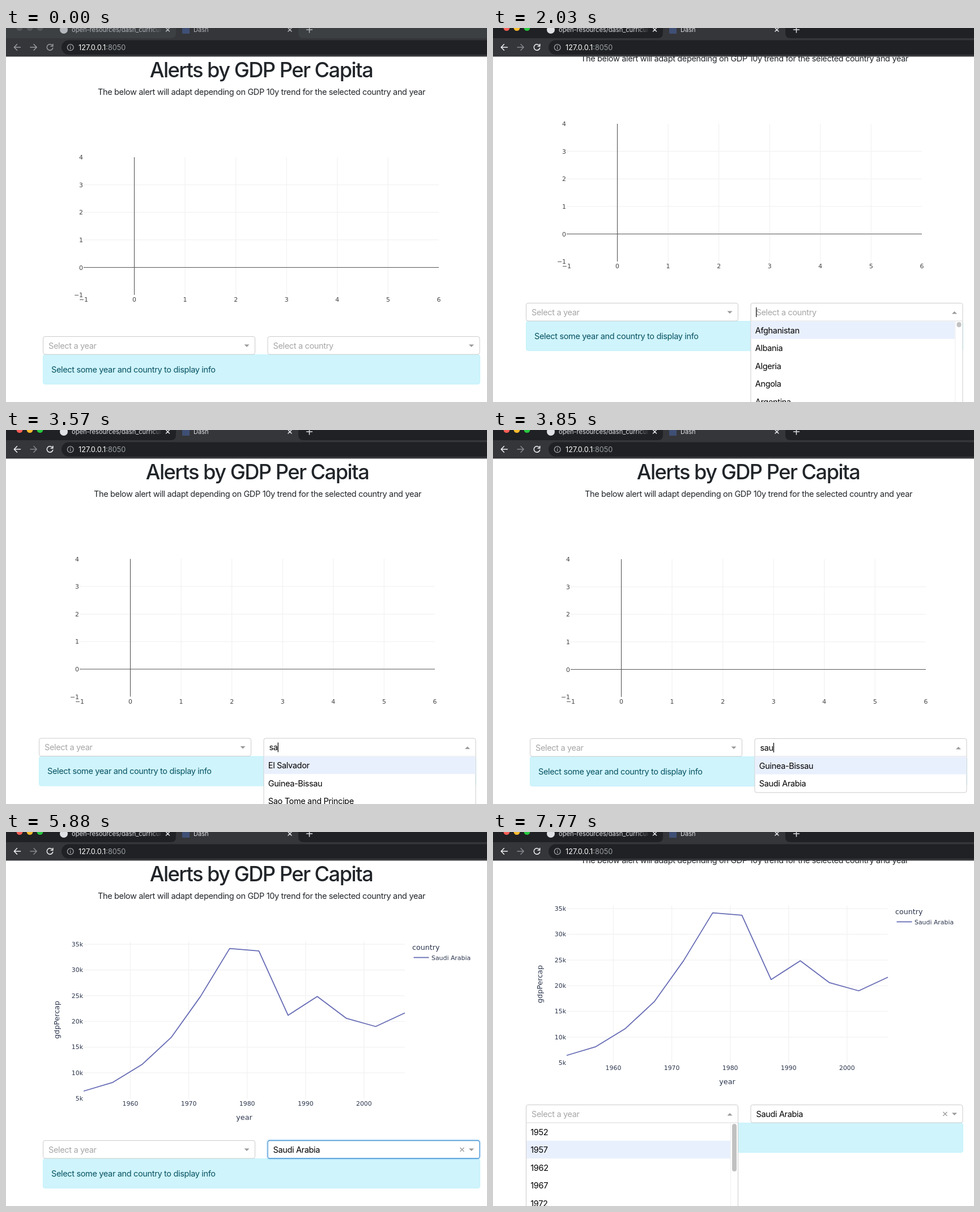
These frames come from a looping animation (849 px wide and 660 px high, 8000 ms). An HTML page:

```html
<!DOCTYPE html>
<html lang="en">
<head>
<meta charset="utf-8">
<title>Alerts by GDP Per Capita</title>
<style>
  html, body { margin: 0; width: 100%; height: 100%; overflow: hidden; background: #fff; }
  svg { display: block; width: 849px; height: 660px; }
  text { font: 14.5px Inter, sans-serif; font-optical-sizing: none; letter-spacing: -.0235em; fill: #212529; white-space: pre; }
  .title { font-size: 36.2px; font-weight: 500; letter-spacing: -.0415em; }
  .mid { text-anchor: middle; }
  .end { text-anchor: end; }
  .plot text { font: 10.9px "DejaVu Sans", sans-serif; letter-spacing: 0; fill: #444; }
  .plot .big { font-size: 12.7px; }
  #trend text { fill: #2a344c; }
  .grid { stroke: #f2f2f3; stroke-width: 1.3; fill: none; }
  .zero { stroke: #555; stroke-width: 1.1; fill: none; }
  .series { stroke: #666bb4; stroke-width: 1.8; fill: none; stroke-linejoin: round; }
  .box { fill: #fff; stroke: #ccc; }
  .focus { stroke: #3f8fd0; stroke-width: 1.3; }
  .ring { fill: none; stroke: #007eff; stroke-opacity: .1; stroke-width: 2.6; }
  .hint { fill: #a6a6a6; }
  .typed { fill: #000; }
  .arrow { fill: #999; }
  .cross { stroke: #999; stroke-width: 1.3; fill: none; }
  .bar text { letter-spacing: 0; }
  .bar .tab { font-size: 11.1px; }
  .bar .url { font-size: 12.7px; fill: #fff; }
  .bar .dim { fill: #9aa0a6; }
  .line { fill: none; stroke-width: 1.5; stroke-linecap: round; stroke-linejoin: round; }
  .bar { --strip: #202124; --ink: #dfe1e5; --nav: #f1f3f4; --next: #85898e; }
  .bar.idle { --strip: #3c4043; --ink: #b4b7bb; --nav: #989ca1; --next: #989ca1; }
  .strip { fill: var(--strip); }
  .clear, .solid { stop-color: var(--strip); }
  .clear { stop-opacity: 0; }
  .tab { fill: var(--ink); }
  .ink { stroke: var(--ink); }
  .nav { stroke: var(--nav); }
  .next { stroke: var(--next); }
  .idle .light { fill: #55575b; }
</style>
</head>
<body>
<svg viewBox="0 0 849 660">
  <rect width="849" height="660" fill="#fff"/>

  <g id="page">
    <text class="title mid" x="450.5" y="87">Alerts by GDP Per Capita</text>
    <text class="mid" x="451" y="118">The below alert will adapt depending on GDP 10y trend for the selected country and year</text>
    <g id="blank" class="plot"></g>
    <g id="trend" class="plot"></g>
    <rect x="65.5" y="576.5" width="771" height="52" rx="3.5" fill="#cff4fc" stroke="#c4f2fb"/>
    <text x="80" y="607.8" style="fill:#055160">Select some year and country to display info</text>
    <g id="form"></g>
    <rect id="caret" y="552" width="1.2" height="17" fill="#000"/>
  </g>

  <g id="bar" class="bar">
    <linearGradient id="fade">
      <stop class="clear" offset="0"/>
      <stop class="solid" offset="1"/>
    </linearGradient>
    <rect class="strip" width="849" height="20"/>
    <path d="M291 18q9 0 9-9V-1H516V9q0 9 9 9z" fill="#35363a"/>
    <rect y="18" width="849" height="32.5" fill="#35363a"/>
    <rect x="98" y="21.5" width="780" height="25.5" rx="12.7" fill="#202124"/>
    <circle class="light" cx="24" cy="-.5" r="5.5" fill="#ff5f57"/>
    <circle class="light" cx="42" cy="-.5" r="5.5" fill="#febc2e"/>
    <circle class="light" cx="60" cy="-.5" r="5.5" fill="#28c840"/>
    <circle class="tab" cx="102" cy="3" r="7"/>
    <text class="tab" x="116" y="6.6">open-resources/dash_curriculum</text>
    <rect x="254" y="0" width="22" height="14" fill="url(#fade)"/>
    <rect class="strip" x="275.5" y="0" width="15" height="14"/>
    <rect x="311" y="-3" width="13" height="13" fill="#3f4f75"/>
    <text class="tab" x="331" y="6.6">Dash</text>
    <path class="line ink" d="M282.5 0l6 6m0-6l-6 6M498 0l6 6m0-6l-6 6M530.5 3h10m-5-5v10"/>
    <path class="line nav" d="M25.5 34H14.5M19.5 28.8L14.3 34l5.2 5.2"/>
    <path class="line next" d="M43 34H54M49 28.8L54.2 34 49 39.2"/>
    <path class="line nav" d="M81.2 30.2A5.3 5.3 0 1 0 82.7 35.3M82.8 28.6V32.2H79.2"/>
    <g fill="none" stroke="#a9adb2" stroke-width="1.2">
      <circle cx="113.7" cy="34.3" r="5.4"/>
      <path d="M113.7 33.5v3.7M113.7 31.2v1.3"/>
    </g>
    <text class="url" x="128" y="38.7">127.0.0.1<tspan class="dim">:8050</tspan></text>
  </g>
</svg>

<script>
const LOOP = 8000, TICK = 70, ROW = 31.65, MENU = 181, TOP = 576;
const $ = id => document.getElementById(id);
const text = (x, y, s, cls = '', more = '') => `<text x="${x}" y="${y}" class="${cls}" ${more}>${s}</text>`;
const path = (d, cls) => `<path d="${d}" class="${cls}"/>`;
const range = (n, f) => Array.from({ length: n }, (_, i) => f(i));

function blankChart() {
  const X = v => 226.5 + v * 89.58, Y = v => 422.5 - v * 48.6;
  const name = v => String(v).replace('-', '\u2212');
  let out = '';
  for (let v = 1; v < 6; v++) out += path(`M${X(v)} 228V471`, 'grid');
  for (let v = 1; v < 4; v++) out += path(`M137 ${Y(v)}H764`, 'grid');
  out += path('M137 422.5H764M226.5 228V471', 'zero');
  for (let v = -1; v < 7; v++) out += text(X(v), 483.3, name(v), 'mid');
  for (let v = -1; v < 5; v++) out += text(136, Y(v) + 4, name(v), 'end');
  return out;
}

function trendChart() {
  const gdp = [6460, 8158, 11626, 16903, 24837, 34168, 33693, 21198, 24842, 20587, 19015, 21655];
  const X = year => 137 + (year - 1952) * 10.31, Y = v => 470.5 - (v - 5000) * .00908;
  let out = '';
  for (let y = 1960; y <= 2000; y += 10)
    out += path(`M${X(y)} 193V471`, 'grid') + text(X(y), 483, y, 'mid');
  for (let k = 5; k <= 35; k += 5)
    out += (k > 5 ? path(`M137 ${Y(k * 1000)}H704`, 'grid') : '') + text(136, Y(k * 1000) + 3.7, k + 'k', 'end');
  out += path('M' + gdp.map((v, i) => `${X(1952 + 5 * i)} ${Y(v)}`).join('L'), 'series');
  out += path('M719.5 221.5H746.5', 'series');
  return out + text(420.5, 507.7, 'year', 'big mid') + text(717, 207.7, 'country', 'big')
    + text(751, 225.5, 'Saudi Arabia')
    + text(0, 0, 'gdpPercap', 'big mid', 'transform="translate(94 331.5) rotate(-90)"');
}

// A dropdown field; f: { open, focus, typed, value }
function field(x, hint, f) {
  const ax = x + 360, up = f.open;
  let out = f.focus ? `<rect x="${x - 1.3}" y="542.7" width="377" height="34.6" rx="5" class="ring"/>` : '';
  out += up
    ? path(`M${x + .5} 576V548q0-3.5 3.5-3.5H${x + 371}q3.5 0 3.5 3.5V576z`, 'box')
    : `<rect x="${x + .5}" y="544.5" width="374" height="31.5" rx="3.5" class="box ${f.focus ? 'focus' : ''}"/>`;
  const s = f.typed || f.value;
  out += text(x + 10, 565.7, s || hint, s ? 'typed' : 'hint', 'data-field');
  out += up ? path(`M${ax - 4.5} 563.5h9l-4.5-4.5z`, 'arrow') : path(`M${ax - 4.5} 558.5h9l-4.5 4.5z`, 'arrow');
  if (f.value) out += path(`M${x + 340} 557l7 7m0-7l-7 7`, 'cross');
  return out;
}

function menu(x, items, total, hi) {
  const h = Math.min(Math.max(total, 1) * ROW, MENU), bar = total * ROW > MENU;
  let out = path(`M${x + .5} ${TOP}V${TOP + h - 3}q0 3.5 3.5 3.5H${x + 371}q3.5 0 3.5-3.5V${TOP}z`, 'box');
  if (total) out += `<rect x="${x + 1}" y="${TOP + hi * ROW}" width="${bar ? 360 : 373}" height="${ROW}" fill="#e9f0fd"/>`;
  out += path(`M${x + 1} ${TOP - .2}H${x + 374}`, 'grid');
  items.forEach((s, i) => out += text(x + 8.3, TOP + 21.5 + i * ROW, s, total ? 'typed' : 'hint'));
  if (bar) {
    const thumb = Math.max(9, (MENU - 5) * MENU / (total * ROW));
    out += path(`M${x + 361.5} ${TOP}v${h}`, 'grid')
      + `<rect x="${x + 364}" y="${TOP + 2}" width="8" height="${thumb}" rx="4" fill="#c1c1c1"/>`;
  }
  return out;
}

const all = ['Afghanistan', 'Albania', 'Algeria', 'Angola', 'Argentina'];
const withS = ['Afghanistan', 'Australia', 'Austria', 'Bangladesh', 'Bosnia and Herzegovina'];
const withSa = ['El Salvador', 'Guinea-Bissau', 'Sao Tome and Principe', 'Saudi Arabia'];
const years = range(5, i => 1952 + 5 * i);
const saudi = ['Saudi Arabia'];

// scroll: [start, distance, duration]; off, on: when the caret blinks out and back
const country = (at, typed, items, more) => ({ at, open: 'country', typed, items, total: items.length, ...more });
const states = [
  { at: 0 },
  country(1820, '', all, { total: 142, scroll: [1797, 63], off: 2380 }),
  country(2100, '', all, { total: 142, hi: 1, scroll: [0, 63], off: 2380 }),
  country(2590, 's', withS, { total: 60, scroll: [0, 63] }),
  country(2730, 'sa', withSa, { scroll: [0, 11] }),
  country(3010, 'say', ['No results found'], { total: 0 }),
  country(3570, 'sa', withSa, { scroll: [3550, 11, 150] }),
  country(3850, 'sau', ['Guinea-Bissau', 'Saudi Arabia']),
  country(3920, 'saud', saudi),
  country(4060, 'saudi', saudi, { off: 4620, on: 5110 }),
  { at: 5460, value: saudi[0], focus: true },
  { at: 5600, value: saudi[0], focus: true, trend: true },
  { at: 7280, open: 'year', items: years, total: 12, value: saudi[0], trend: true, scroll: [7217, 63], off: 7770 },
  { at: 7490, open: 'year', items: years, total: 12, hi: 1, value: saudi[0], trend: true, scroll: [7217, 63], off: 7770 }
];

const left = { year: 65, country: 461.5 };
let shown, caretX = 0;

function show(s) {
  const inCountry = s.open === 'country';
  $('blank').style.display = s.trend ? 'none' : '';
  $('trend').style.display = s.trend ? '' : 'none';
  $('form').innerHTML = field(left.year, 'Select a year', { open: s.open === 'year' })
    + field(left.country, 'Select a country', { open: inCountry, focus: s.focus, typed: s.typed, value: s.value })
    + (s.open ? menu(left[s.open], s.items, s.total, s.hi || 0) : '');
  const label = document.querySelectorAll('[data-field]')[1];
  caretX = (left[s.open] || 0) + 10 + (s.typed ? label.getComputedTextLength() : -.3);
}

function draw(now) {
  const t = Math.floor(now % LOOP / TICK) * TICK;
  const s = states.findLast(p => p.at <= t);
  if (s !== shown) show(shown = s);

  let y = 0;
  if (s.scroll) {
    const [start, distance, time = 275] = s.scroll;
    const p = Math.min(1, Math.max(0, (t - start) / time));
    y = -distance * p * p * (3 - 2 * p);
  }
  $('page').setAttribute('transform', `translate(${s.scroll ? -7 : 0} ${Math.round(y * 2) / 2})`);

  const lit = s.open && !(t >= s.off && t < (s.on || LOOP));
  $('caret').style.display = lit ? '' : 'none';
  $('caret').setAttribute('x', caretX);
  $('bar').classList.toggle('idle', t < 980);
}

$('blank').innerHTML = blankChart();
$('trend').innerHTML = trendChart();
const begin = performance.now();
function loop() {
  draw(performance.now() - begin);
  requestAnimationFrame(loop);
}
loop();
</script>
</body>
</html>
```
